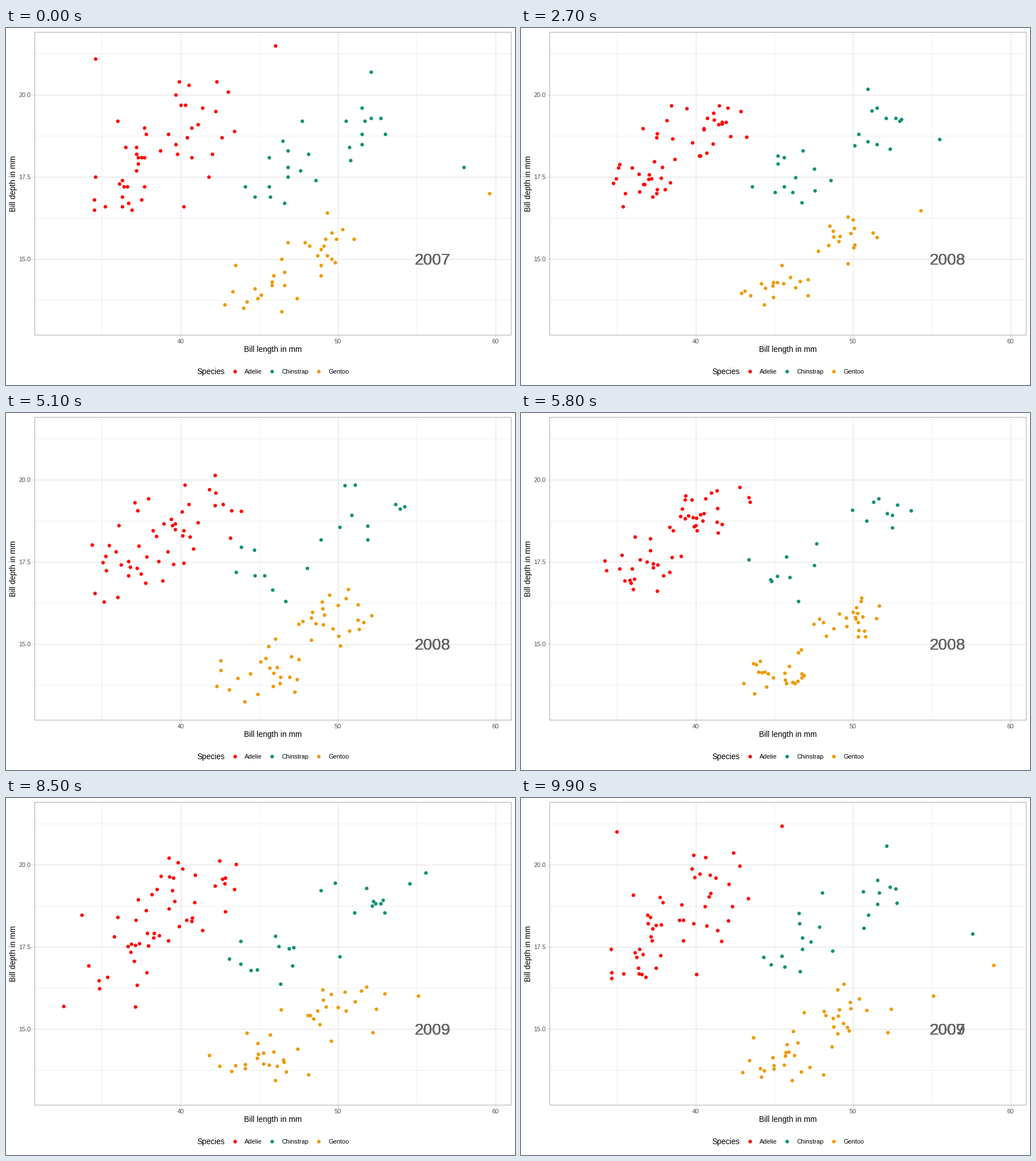
Animation, 894 px wide and 626 px high, one loop 10000 ms. Source, as a matplotlib script:

```python
import numpy as np
import matplotlib.pyplot as plt
from matplotlib.animation import FuncAnimation
from matplotlib.patches import Rectangle

W, H, DPI = 894, 626, 100
PT = 72 / DPI  # points per pixel
FRAMES, INTERVAL = 100, 100
MOVES = [(16, 33), (50, 67), (84, 100)]  # frames where each move starts and ends
YEARS = ["2007", "2008", "2009"]
X40, Y20, DX, DY = 306.7, 117.3, 27.65, 57.5  # pixels at 40 and 20, pixels per mm

plt.rcParams["font.family"] = "Liberation Sans"
rng = np.random.default_rng(7)

# Females and males form two clumps per species and alternate row by row.
# name, colour, female mean, male mean, spread, birds per year
SPECIES = [
    ("Adelie", "#ff0000", (37.3, 17.6), (40.4, 19.1), (2.1, 0.95), (49, 50, 52)),
    ("Chinstrap", "#119076", (46.4, 17.5), (51.1, 19.3), (2.0, 0.75), (26, 18, 24)),
    ("Gentoo", "#ee9a0a", (45.4, 14.2), (49.4, 15.7), (1.9, 0.6), (34, 46, 43)),
]

# birds far from their clump: (species, year, row)
LONERS = {
    ("Adelie", 0, 13): (34.6, 21.1),
    ("Adelie", 0, 18): (46, 21.5),
    ("Adelie", 2, 42): (32.1, 15.5),
    ("Chinstrap", 0, 17): (58, 17.8),
    ("Chinstrap", 2, 19): (55.8, 19.8),
    ("Gentoo", 0, 33): (59.6, 17),
    ("Gentoo", 2, 41): (55.1, 16),
}


def to_px(x, y):
    return X40 + (x - 40) * DX, Y20 + (20 - y) * DY


def cloud(name, year, count, female, male, spread):
    """Seeded birds, cut off at two deviations and kept from overlapping."""
    pts = np.empty((0, 2))
    while len(pts) < count:
        row = len(pts)
        a, b = rng.normal(size=2)
        z = np.array([a, 0.3 * a + 0.95 * b])
        p = np.round((female, male)[row % 2] + z * spread, 1)
        p = np.array(LONERS.get((name, year, row), p))
        lone = (name, year, row) in LONERS
        gaps = np.hypot(*((pts - p) * (DX, DY)).T)
        if lone or (np.hypot(*z) < 2.1 and np.all(gaps > 5)):
            pts = np.vstack([pts, p])
    return np.column_stack(to_px(*pts.T))


fig = plt.figure(figsize=(W / DPI, H / DPI), dpi=DPI, facecolor="white")
ax = fig.add_axes([0, 0, 1, 1])
ax.set(xlim=(0, W), ylim=(H, 0))
ax.axis("off")
LEFT, BOTTOM = to_px(30.725, 12.68)
RIGHT, TOP = to_px(60.975, 21.92)


def line(xs, ys, color, z=1):
    ax.plot(xs, ys, color=color, lw=PT, zorder=z, solid_capstyle="butt")


def text(x, y, s, size, color="black", ha="center", **kw):
    return ax.text(x, y, s, fontsize=size * PT, color=color, ha=ha,
                   va="baseline", **kw)


def dots(xy, color):
    xy = np.atleast_2d(xy)
    return ax.scatter(xy[:, 0], xy[:, 1], s=(6.3 * PT) ** 2, color=color,
                      linewidths=0, zorder=3, snap=False)


# grid, ticks and frame
for v in range(35, 61, 5):
    x = to_px(v, 0)[0]
    major = v % 10 == 0
    line([x, x], [TOP, BOTTOM], "#e0e0e0" if major else "#eeeeee", 1 + major)
    if major:
        line([x, x], [BOTTOM, BOTTOM + 3.4], "#c8c8c8", 2)
        text(x, 553, str(v), 11, "#4d4d4d")
for v in np.arange(13.75, 21.5, 1.25):
    y = to_px(0, v)[1]
    major = v % 2.5 == 0
    line([LEFT, RIGHT], [y, y], "#e0e0e0" if major else "#eeeeee", 1 + major)
    if major:
        line([LEFT - 3.4, LEFT], [y, y], "#c8c8c8", 2)
        text(44, y + 4, f"{v:.1f}", 11, "#4d4d4d", "right")
ax.add_patch(Rectangle((LEFT, TOP), RIGHT - LEFT, BOTTOM - TOP, fill=False,
                       ec="#b8b8b8", lw=1.2 * PT, zorder=4))

# titles and legend
text((LEFT + RIGHT) / 2, 568, "Bill length in mm", 13.75)
text(17, (TOP + BOTTOM) / 2, "Bill depth in mm", 13.75, rotation=90,
     rotation_mode="anchor")
text(335, 607, "Species", 13.75, ha="left")

groups = []
for (name, color, *shape, counts), x in zip(SPECIES, (401.5, 466.8, 548.8)):
    dots((x, 602), color)
    text(x + 17.3, 606.5, name, 11, ha="left")
    years = [cloud(name, k, n, *shape) for k, n in enumerate(counts)]
    groups.append((years, dots(years[0], color)))


def stamp():
    # stacked copies give the year its heavy, hard edge
    return [text(749, 415, "", 28.45, "#666666", zorder=5) for _ in range(6)]


year_now, year_left = stamp(), stamp()


def stage(frame):
    """Year index and linear progress towards the next year."""
    for k, (start, end) in enumerate(MOVES):
        if frame < end:
            return k, max(0, (frame - start) / (end - start))


def update(frame):
    k, t = stage(frame)
    nxt = (k + 1) % 3
    for years, artist in groups:
        a, b = years[k], years[nxt]
        n = min(len(a), len(b))
        # birds without a partner wait in place until the move ends
        artist.set_offsets(np.vstack([a[:n] + t * (b[:n] - a[:n]), a[n:]]))
    late = t >= 0.5
    for label in year_now:
        label.set_text(YEARS[nxt if late else k])
    for label in year_left:
        label.set_text(YEARS[k] if late and k == 2 else "")


anim = FuncAnimation(fig, update, frames=FRAMES, interval=INTERVAL,
                     repeat=True, cache_frame_data=False)
plt.show()
```
